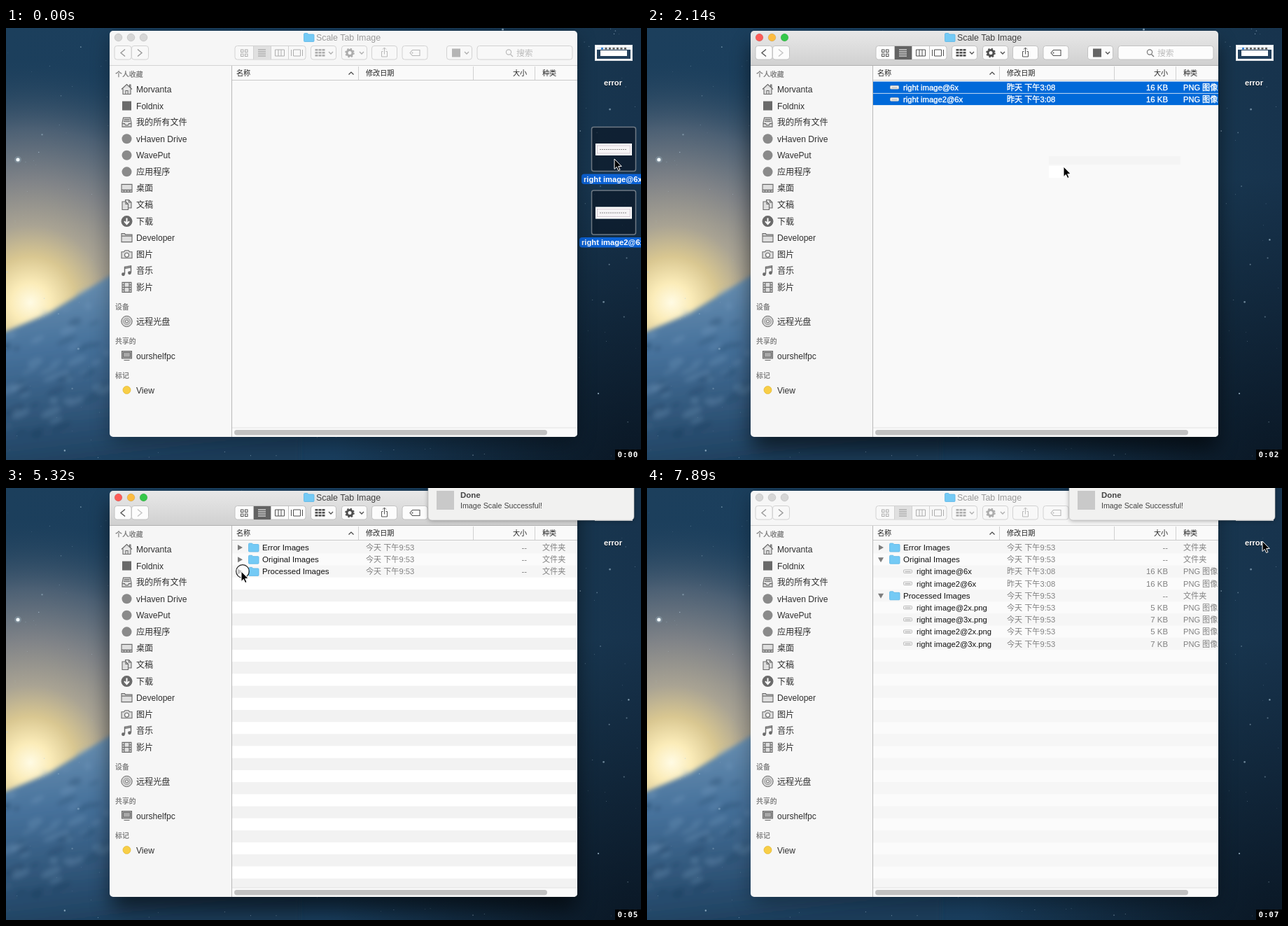
An HTML page for the animation above (8 s loop, 907x617 px).

```html
<!DOCTYPE html>
<html lang="zh">
<head>
<meta charset="utf-8">
<title>Image scaling</title>
<style>
html, body { margin: 0; width: 100%; height: 100%; overflow: hidden; background: #17324c; }
svg { display: block; width: 907px; height: 617px; }
text { font-family: "Liberation Sans", "Noto Sans CJK SC", "Noto Sans CJK", sans-serif; white-space: pre; }
.clock { font-family: "DejaVu Sans Mono", monospace; }
</style>
</head>
<body>
<svg viewBox="0 0 907 617">
  <defs>
    <linearGradient id="sky"><stop stop-color="#1c3f5c"/><stop offset=".5" stop-color="#193e5e"/><stop offset=".9" stop-color="#18364f"/><stop offset="1" stop-color="#17334d"/></linearGradient>
    <radialGradient id="glow" gradientUnits="userSpaceOnUse" cx="35" cy="392" r="345">
      <stop stop-color="#fffbe4"/><stop offset=".08" stop-color="#fbecb9"/><stop offset=".19" stop-color="#d9c791"/><stop offset=".32" stop-color="#a9a393"/>
      <stop offset=".5" stop-color="#818488"/><stop offset=".72" stop-color="#4c6074"/><stop offset="1" stop-color="#234460" stop-opacity="0"/>
    </radialGradient>
    <linearGradient id="dust" x2=".15" y2="1"><stop offset=".2" stop-color="#6d93b4"/><stop offset=".5" stop-color="#46719b"/><stop offset="1" stop-color="#1b3c5a"/></linearGradient>
    <radialGradient id="night" gradientUnits="userSpaceOnUse" cx="900" cy="640" r="430"><stop stop-color="#07111c" stop-opacity=".85"/><stop offset="1" stop-color="#07111c" stop-opacity="0"/></radialGradient>
    <linearGradient id="bar" x2="0" y2="1"><stop stop-color="#e8e8e8"/><stop offset="1" stop-color="#d0d0d0"/></linearGradient>
    <filter id="soft" x="-20%" y="-20%" width="140%" height="140%"><feGaussianBlur stdDeviation="3"/></filter>
    <filter id="shade" x="-20%" y="-20%" width="140%" height="140%"><feGaussianBlur stdDeviation="15"/></filter>
    <clipPath id="frame"><rect x="148" y="4" width="668" height="580" rx="5"/></clipPath>
  </defs>
  <g id="back"></g>
  <g id="scene"></g>
</svg>
<script>
const $ = id => document.getElementById(id);
const LOOP = 8000, ROW = 17.2;

const box = (x, y, w, h, fill, more = '') => `<rect x="${x}" y="${y}" width="${w}" height="${h}" fill="${fill}" ${more}/>`;
const dot = (x, y, r, fill, more = '') => `<circle cx="${x}" cy="${y}" r="${r}" fill="${fill}" ${more}/>`;
const line = (d, color, width = 1, fill = 'none', at = '') =>
  `<path d="${d}" stroke="${color}" stroke-width="${width}" fill="${fill}" ${at && `transform="translate(${at})"`}/>`;
const text = (x, y, s, size, fill, more = '') => `<text x="${x}" y="${y}" font-size="${size}" fill="${fill}" ${more}>${s}</text>`;
const END = 'text-anchor="end"', MID = 'text-anchor="middle"', BOLD = 'font-weight="bold"';

function random(seed) {
  return () => (seed = seed * 16807 % 2147483647) / 2147483647;
}

function backdrop() {
  const rnd = random(77);
  let s = box(0, 0, 907, 617, 'url(#sky)') + box(0, 0, 460, 617, 'url(#glow)');
  s += '<g filter="url(#soft)"><path d="M-20 442L60 408 148 354 420 290V640H-20Z" fill="url(#dust)"/>';
  for (let i = 0; i < 60; i++) {
    const x = rnd() * 150, y = 430 - x * .5 + rnd() * 180;
    s += `<ellipse cx="${x}" cy="${y}" rx="${4 + rnd() * 12}" ry="${2 + rnd() * 4}" transform="rotate(-25 ${x} ${y})" fill="${rnd() < .5 ? '#193a5a' : '#7fa5c6'}" opacity=".25"/>`;
  }
  s += '</g>' + box(0, 0, 907, 617, 'url(#night)');
  for (let i = 0; i < 330; i++)
    s += dot(rnd() * 907, rnd() * 617, .4 + rnd() ** 4 * 1.1, '#b9d4e6', `opacity="${.25 + rnd() * .5}"`);
  return s + dot(17, 188, 5, '#9fb8c8', 'opacity=".3"') + dot(17, 188, 2.6, '#f2f8fb');
}

// Playback advances in short bursts: start, end, number of steps.
const bursts = [[300, 1000, 6], [1450, 2440, 8], [2740, 3180, 4], [3480, 4470, 8], [4620, 5610, 8], [5760, 6750, 8], [6900, 7890, 8]];
function stepped(t) {
  const b = bursts.filter(b => t >= b[0]).pop();
  if (!b) return 0;
  const [from, to, n] = b, step = (to - from) / (n - 1);
  return from + step * Math.min(n - 1, Math.floor((t - from + 25) / step));
}

const path = [[300, 869, 187], [440, 825, 186], [580, 738, 184], [720, 646, 183], [860, 590, 184], [1000, 576, 184], [1590, 576, 184],
  [2016, 595, 198], [3480, 595, 198], [3763, 633, 211], [4050, 633, 211], [4470, 560, 196], [5180, 336, 119], [5760, 336, 119],
  [6040, 340, 105], [6900, 340, 105], [7400, 780, 62], [7890, 879, 76]];
function pointer(t) {
  const i = path.findIndex(p => p[0] >= t);
  if (i < 1) return path[i ? path.length - 1 : 0].slice(1);
  const [a, b] = [path[i - 1], path[i]], k = (t - a[0]) / (b[0] - a[0]);
  return [1, 2].map(j => a[j] + (b[j] - a[j]) * k);
}

const folder = (x, y) => line('M0 1.5Q0 0 1 0H5L6.5 1.5H13.5Q14.5 1.5 14.5 2.5V11Q14.5 12 13.5 12H1Q0 12 0 11Z', '#5bb5e6', .8, '#74caf5', `${x} ${y}`);

const glyphs = {
  home: 'M-7.5 0L0-7 7.5 0M-5.5-1V7H5.5V-1M-1.5 7V2H1.5V7M4-3V-6.5H5.5V-2',
  files: 'M-6.5 6.5V1L-5-6.5H5L6.5 1V6.5ZM-6.5 2H-3L-2 4H2L3 2H6.5M-4-4H4M-4.500-1.500H4.500',
  desk: 'M-7.5-5.500H7.500V5.500H-7.500ZM-7.500 2.500H7.500M-5 4H-3M-1 4H1M3 4H5',
  docs: 'M-2-4V-7H3L6.500-3.500V4.500H2M3-7V-3.500H6.500M-6.500-4.500H-1.500L2-1V7H-6.500ZM-1.500-4.500V-1H2',
  folder: 'M-7.500 6V-6H-3L-2-4.500H7.500V6ZM-7.500-2.500H7.500',
  photo: 'M-7.500 5.500V-3.500H-4L-2.500-5.500H2.500L4-3.500H7.500V5.500ZM-3 1A3 3 0 1 0 3 1A3 3 0 1 0-3 1',
  film: 'M-6.500-7H6.500V7H-6.500ZM-3.500-7V7M3.500-7V7M-3.500 0H3.500M-6.500-3.500H-3.500M-6.500 3.500H-3.500M3.500-3.500H6.500M3.500 3.500H6.500M-6.500 0H-3.500M3.500 0H6.500',
  screen: 'M-7-6.500H7V4H-7ZM-5-4.500H5V2H-5ZM-4 6.500H4'
};
function icon(kind, y) {
  const g = '#6a6a6a', x = 172.5;
  if (kind === 'square') return box(x - 6.5, y - 6.5, 13, 13, g);
  if (kind === 'circle') return dot(x, y, 7, '#8a8a8a');
  if (kind === 'down') return dot(x, y, 8, g) + line('M0-4.500V3M-3.500 0L0 4 3.500 0', '#fff', 2, 'none', `${x} ${y}`);
  if (kind === 'music') return line('M-3 4.500V-5.500L6-7V2.500M-3-3.500L6-5', g, 1.4, 'none', `${x} ${y}`) + dot(x - 5, y + 5, 2.4, g) + dot(x + 4, y + 3, 2.4, g);
  if (kind === 'disc') return dot(x, y, 7.7, '#d4d4d4', `stroke="${g}"`) + dot(x, y, 4.5, 'none', 'stroke="#999"') + dot(x, y, 2, '#fff', `stroke="${g}"`);
  if (kind === 'tag') return dot(x, y, 5.5, '#f8ce46', 'stroke="#e0b52e" stroke-width=".7"');
  return line(glyphs[kind], g, 1.1, kind === 'screen' ? '#aaa' : '#dedede', `${x} ${y}`);
}

const places = [['home', 'Morvanta'], ['square', 'Foldnix'], ['files', '我的所有文件'], ['circle', 'vHaven Drive'], ['circle', 'WavePut'],
  ['circle', '应用程序'], ['desk', '桌面'], ['docs', '文稿'], ['down', '下载'], ['folder', 'Developer'], ['photo', '图片'], ['music', '音乐'], ['film', '影片'],
  ['disc', '远程光盘', 419], ['screen', 'ourshelfpc', 468], ['tag', 'View', 517]];
function sidebar(active) {
  let s = box(148, 54, 174, 530, active ? '#f6f6f6' : '#f7f7f7') + box(322, 54, 1, 530, '#b9b9b9');
  [['个人收藏', 66], ['设备', 398], ['共享的', 447], ['标记', 496]].forEach(([name, y]) => s += text(156, y + 4, name, 9.9, '#858585', BOLD));
  places.forEach(([kind, name, y = 87.5 + 23.57 * places.findIndex(p => p[1] === name)]) =>
    s += icon(kind, y) + text(186, y + 4.5, name, 12.1, '#303030'));
  return s;
}

function toolbar(active, share) {
  const ink = active ? '#4f4f4f' : '#adadad', dim = '#b8b8b8', edge = active ? '#c2c2c2' : '#d2d2d2', face = active ? '#fcfcfc' : '#f8f8f8';
  const button = (x, w) => box(x + .5, 25.5, w, 19.5, face, `rx="3.500" stroke="${edge}"`);
  const caret = x => line('M-3-1.500L0 1.500 3-1.500', ink, 1.3, 'none', `${x} 35.500`);
  let s = box(148, 4, 668, 50, active ? 'url(#bar)' : '#f6f6f6') + box(148, 53, 668, 1, active ? '#b1b1b1' : '#d3d3d3');
  ['#fc5b57', '#fdbc40', '#34c749'].forEach((c, i) => s += dot(160.5 + 18 * i, 13.5, 5.4, active ? c : '#d6d6d6', `stroke="#0002" stroke-width=".8"`));
  s += folder(425.5, 7.5) + text(443, 18.3, 'Scale Tab Image', 12.4, active ? '#404040' : '#9a9a9a');
  [[154.5, 24], [179, 24], [326.5, 101], [435, 36], [479, 36], [522, 36], [565.5, 36], [629, 36], [672.5, 136]].forEach(b => s += button(...b));
  s += line('M3-5L-3 0 3 5', active ? '#555' : '#999', 1.4, 'none', '167 35.500') + line('M-3-5L3 0-3 5', active ? '#c4c4c4' : '#999', 1.4, 'none', '191 35.500');
  s += box(353, 26, 25, 19, active ? '#636363' : '#e0e0e0') + line('M353.500 26V45M378.500 26V45M403.500 26V45', edge);
  for (let i = 0; i < 4; i++)
    s += box(335.5 + 6 * (i % 2), 31 + 6 * (i >> 1), 3.5, 3.5, 'none', `stroke="${ink}"`) + box(360, 30.5 + 3 * i, 11, 1, active ? '#fff' : '#999');
  s += line('M384.500 31H397.500V40H384.500ZM389 31V40M393 31V40M410.500 31H420.500V40H410.500ZM407.500 31V40M423.500 31V40', ink);
  for (let i = 0; i < 9; i++) s += box(441.5 + 5 * (i % 3), 30 + 4 * Math.floor(i / 3), 4, 2.6, ink);
  s += caret(464) + dot(491, 35.5, 4, 'none', `stroke="${ink}" stroke-width="3"`) + dot(491, 35.5, 5.8, 'none', `stroke="${ink}" stroke-width="2" stroke-dasharray="2.300 2.255"`) + caret(508);
  const on = share ? '#555' : dim;
  s += line('M-2-1.500H-4V6H4V-1.500H2M0 2.500V-7M-2.500-4.500L0-7 2.500-4.500', on, 1, 'none', '540.500 35') +
    line('M-7.500 0L-4-4H6.500V4H-4Z', on, 1.1, 'none', '584.500 35.500') + dot(580.5, 35.5, 1, on);
  s += box(637, 29.5, 12, 12, active ? '#666' : '#b5b5b5') + caret(658);
  return s + dot(718, 34.5, 3.6, 'none', `stroke="${active ? '#777' : '#bbb'}" stroke-width="1.200"`) + line('M720.500 37.500L724 41', active ? '#777' : '#bbb', 1.3) + text(729, 39.7, '搜索', 11.8, '#bcbcbc');
}

// Each row: name, kind, indent level, open or selected.
function listing(t) {
  if (t < 1860) return [];
  const pair = sel => ['right image@6x', 'right image2@6x'].map(n => [n, 'big', sel ? 0 : 1, sel]);
  const names = ['Error', 'Original', 'Processed'], shown = t < 2870 ? t < 2740 ? 0 : 1 : t < 3020 ? 2 : 3;
  const open = [false, t >= 6150, t >= 5450];
  let rows = [];
  names.slice(0, shown).forEach((n, i) => {
    rows.push([n + ' Images', t < 4000 && i < 2 ? 'new' : 'dir', 0, open[i]]);
    if (!open[i]) return;
    if (i === 1) rows.push(...pair(false));
    else ['', '2'].forEach(v => [2, 3].forEach(k => rows.push([`right image${v}@${k}x.png`, k, 1, false])));
  });
  return t < 4030 ? rows.concat(pair(true)) : rows;
}

function row([name, kind, level, flag], i) {
  const y = 85 + ROW * i, dir = kind === 'dir' || kind === 'new', sel = kind === 'big' && flag;
  const grey = sel ? '#fff' : '#808080', b = y + 4, thick = sel ? 'stroke="#fff" stroke-width=".350"' : '';
  let s = sel ? box(323, y - 8.5, 493, 16.4, '#0069d9') : '';
  if (dir) s += line(flag ? 'M-4-3H4L0 4Z' : 'M-3-4V4L4 0Z', 'none', 0, '#7d7d7d', `334 ${y}`) + folder(346.5, y - 6);
  else s += box(level ? 366.5 : 347.5, y - 2.5, 12, 4.5, '#f4f4f4', 'stroke="#bbb" rx="1"') + box(level ? 368.5 : 349.5, y - .5, 8, 1, '#aaa');
  s += text(level ? 385 : 366, b, name, dir ? 11.55 : 11.25, sel ? '#fff' : '#111', thick);
  s += text(514, b, dir || typeof kind === 'number' ? '今天 下午9:53' : '昨天 下午3:08', 11.1, grey, thick);
  s += text(744, b, dir ? '--' : kind === 'big' ? '16 KB' : (kind === 2 ? 5 : 7) + ' KB', 11.4, grey, END + thick);
  return s + text(766, b, kind === 'dir' ? '文件夹' : kind === 'new' ? '--' : 'PNG 图像', 11.1, grey, thick);
}

function table(t) {
  let s = box(323, 54, 493, 530, '#f9f9f9');
  const band = (i, x, w, pale, dark) => box(x, 76.2 + ROW * i, w, ROW, i % 2 ? pale : dark);
  const strong = t >= 4030 && t < 6000, faint = t >= 7450;
  if (strong || faint)
    for (let i = 0; i < 29; i++) s += band(i, 323, 493, strong && i > 2 ? '#fff' : '#fbfbfb', strong && i > 2 ? '#f2f2f2' : '#f6f6f6');
  if (t >= 980 && t < 1860) for (let i = 5; i < 14; i++) s += box(536, 76.2 + ROW * i - (i === 5 ? 1 : 0), 226, i > 12 ? 14 : ROW, i % 2 ? '#fff' : '#f2f2f2');
  if (t >= 1860 && t < 4030) s += box(574, 183, 188, 12, '#f4f4f4') + box(574, 197, t > 3700 ? 53 : 22, 17, '#fff');
  s += box(323, 54, 493, 20, '#fafafa') + box(323, 74, 493, 1, '#c9c9c9') + line('M503.500 55V74M667.500 55V74M755.500 55V74', '#d0d0d0');
  [[329, '名称'], [514, '修改日期'], [724, '大小'], [766, '种类']].forEach(([x, n]) => s += text(x, 68, n, 10.1, '#222'));
  s += line('M489.500 66.500L493 63 496.500 66.500', '#444', 1.2) + listing(t).map(row).join('');
  s += box(323, 571, 493, 13, '#fafafa') + box(323, 570.5, 493, 1, '#e4e4e4') + box(326, 574, 447, 7.5, '#c1c1c1', 'rx="3.700"');
  if (t >= 560 && t < 1700) s += box(324, 54.5, 491, 516, 'none', 'stroke="#a9cdea" stroke-width="2"');
  return s;
}

const thumb = y => box(842, y - 8.5, 52, 17, '#fff') + box(844.5, y - 5.5, 47, 11, '#f6f4f6', 'stroke="#c9b9c6" stroke-width=".700"') + line(`M848 ${y}H886`, '#888', 1.2).replace('/>', ' stroke-dasharray="2 1"/>');
function desktopFile(y, x, name, label = true) {
  return box(836.5, y - 32, 63, 63, '#0b1726aa', 'rx="3" stroke="#6f7a85" stroke-width="1.500"') + thumb(y) +
    (label ? box(x, y + 35, 110, 14.5, '#0c63d6', 'rx="4"') + text(x + 3, y + 46.3, name, 11.2, '#fff', BOLD) : '');
}
function desktop(t) {
  let s = box(841.5, 24.5, 53, 22, '#fff', 'stroke="#d8dde2"') + box(844, 27, 48, 17, '#23405c') + box(849, 32, 38, 8, '#fff') + box(844, 27, 48, 4, '#e8eef2');
  for (let i = 0; i < 7; i++) s += box(850 + 5.5 * i, 28, 3, 2.5, i ? '#555' : '#2b79d2');
  s += text(867, 82.5, 'error', 11.2, '#000', MID + BOLD + ' opacity=".6"') + text(867, 81.5, 'error', 11.2, '#fff', MID + BOLD);
  return t < 1720 ? s + desktopFile(173.5, 822, 'right image@6x') + desktopFile(264, 819, 'right image2@6x') : s;
}

function dragged(t, x, y) {
  if (t < 420 || t >= 1700) return '';
  let s = '';
  if (t < 700) s = `<g opacity=".5" transform="translate(${x - 869} ${y - 187})">${thumb(173.5)}${thumb(264)}</g>`;
  else [['right image2@6x', 66], ['right image@6x', 124]].forEach(([n, d]) =>
    s += box(x + 17, y + d - 2, 13, 4, '#f4f4f4', 'stroke="#c4c4c4" rx="1"') + box(x + 32.5, y + d - 7.5, 113, 14.5, '#2b7de0', 'rx="7"') + text(x + 36, y + d + 4, n, 11.25, '#fff'));
  return s + dot(x + 10, y + 18, 8, '#fb3a3a') + text(x + 10, y + 22, '2', 11, '#fff', MID);
}

function notice(t) {
  if (t < 3600) return '';
  const x = t < 3740 ? 722 : t < 3900 ? 611 : 603;
  return box(x, -8, 294, 55, '#000', 'rx="5" opacity=".3" filter="url(#soft)"') + box(x, -8, 294, 54, '#f1f1f0', 'rx="5" stroke="#bdbdbd" stroke-width=".600"') +
    box(x + 12, 4, 25, 27, '#c9c9c9') + text(x + 46, 14, 'Done', 11.4, '#444', BOLD) + text(x + 46, 29.3, 'Image Scale Successful!', 10.7, '#444');
}

function scene(t) {
  const active = t >= 1860 && t < 7450, [x, y] = pointer(t);
  const clicks = t > 5300 && t < 5440 || t > 6030 && t < 6150;
  const seconds = [980, 1990, 3000, 4030, 5040, 6440, 7300].filter(s => t >= s).length;
  return desktop(t) + box(150, active ? 22 : 12, 664, 580, '#000', `rx="6" opacity="${active ? .6 : .35}" filter="url(#shade)"`) +
    `<g clip-path="url(#frame)">${table(t)}${sidebar(active)}${toolbar(active, active && t < 5450)}</g>` +
    notice(t) + dragged(t, x, y) +
    (clicks ? dot(x + 2, y, 9.3, '#fff', 'fill-opacity=".5" stroke="#222" stroke-width="1.200"') : '') +
    line('M0 0V14.500L3.300 11.400 5.700 16.500 8 15.500 5.700 10.500H10.200Z', '#fff', 1, '#000', `${x} ${y}`) +
    box(870, 602, 37, 15, '#000') + text(873.5, 613, '0:0' + seconds, 11, '#fff', 'class="clock" font-weight="bold" letter-spacing=".800"');
}

let last = -1;
function frame() {
  const t = stepped(performance.now() % LOOP);
  if (t !== last) $('scene').innerHTML = scene(last = t);
  requestAnimationFrame(frame);
}
$('back').innerHTML = backdrop();
frame();
</script>
</body>
</html>
```
